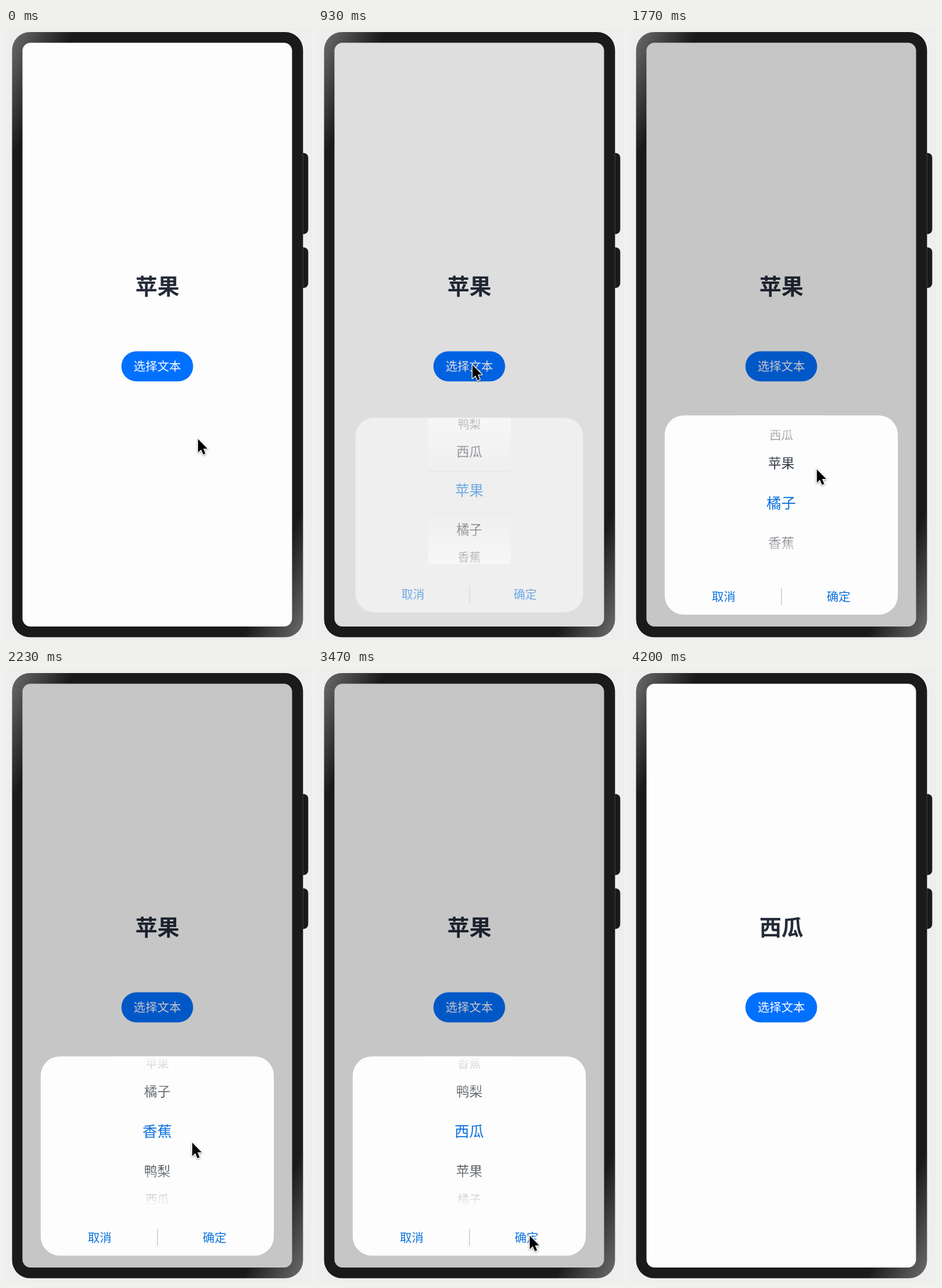
These frames come from a looping animation (529 by 1059 pixels, 4960 ms). An HTML page:

```html
<!DOCTYPE html>
<html lang="zh-CN">
<head>
<meta charset="utf-8">
<title>文本选择器</title>
<style>
  html, body { margin: 0; width: 100%; height: 100%; overflow: hidden; background: #eee; }
  svg { display: block; width: 100vw; height: 100vh; }
  text { font-family: "Noto Sans CJK SC", "Noto Sans CJK", sans-serif; font-weight: 500; text-anchor: middle; }
  #panel > * { opacity: var(--alpha); }
  .action { font-size: 20.5px; fill: #0a72de; }
  .item { fill: #1a222c; }
  .item.on { fill: #0a70dd; }
  #cursor { filter: drop-shadow(0 1.5px 1.5px rgba(0, 0, 0, .4)); }
</style>
</head>
<body>
<svg viewBox="0 0 529 1059">
  <defs>
    <linearGradient id="metal" gradientUnits="userSpaceOnUse" x1="13.6" y1="6.4" x2="823.5" y2="389">
      <stop offset="0" stop-color="#6a6a6a"/>
      <stop offset=".103" stop-color="#1a1a1a"/>
      <stop offset=".897" stop-color="#1a1a1a"/>
      <stop offset="1" stop-color="#6a6a6a"/>
    </linearGradient>
    <linearGradient id="fadeTop" x2="0" y2="1">
      <stop offset="0" stop-color="#fdfdfd"/>
      <stop offset="1" stop-color="#fdfdfd" stop-opacity="0"/>
    </linearGradient>
    <linearGradient id="fadeBottom" x2="0" y2="1">
      <stop offset="0" stop-color="#fdfdfd" stop-opacity="0"/>
      <stop offset="1" stop-color="#fdfdfd"/>
    </linearGradient>
    <clipPath id="window"><rect x="188" y="669" width="147" height="259"/></clipPath>
  </defs>

  <rect width="529" height="1059" fill="#eee"/>
  <g fill="#1a1a1a">
    <path d="M513 216h1.5a8 8 0 0 1 8 8v124a8 8 0 0 1-8 8H513z"/>
    <path d="M513 379h1.5a8 8 0 0 1 8 8v54a8 8 0 0 1-8 8H513z"/>
  </g>
  <rect x="10.5" y="7" width="503" height="1045.5" rx="31" fill="url(#metal)"/>
  <path d="M513.5 217v138M513.5 380v68" stroke="#555" stroke-width=".7"/>
  <rect x="28.5" y="25.5" width="466" height="1008.5" rx="14" fill="#fdfdfd"/>

  <text id="title" x="261.7" y="459.5" font-size="38" fill="#242b39" style="font-weight:700"></text>
  <rect x="199.5" y="558.5" width="124" height="52" rx="26" fill="#0070ff"/>
  <text x="261.5" y="592.3" font-size="20.5" fill="#fff">选择文本</text>

  <rect id="dim" x="28.5" y="25.5" width="466" height="1008.5" rx="14"/>

  <g id="panel">
    <rect x="60" y="669.3" width="403" height="344.2" rx="33" fill="#fdfdfd"/>
    <g id="wheel" clip-path="url(#window)"></g>
    <rect x="188" y="669.3" width="147" height="94" fill="url(#fadeTop)"/>
    <rect x="188" y="836" width="147" height="92" fill="url(#fadeBottom)"/>
    <path id="rules" d="M188 763.5h147M188 836h147" stroke="#000"/>
    <path d="M261.8 967v30" stroke="#c4c4c4" stroke-width="1.3"/>
    <text class="action" x="162" y="989.8">取消</text>
    <text class="action" x="360.5" y="989.8">确定</text>
  </g>

  <path id="cursor" d="M0 0V23.2L5.3 18.2 9 26.8 12.8 25.2 9.1 16.7H16.3Z"
        fill="#000" stroke="#fff" stroke-width="2.6" paint-order="stroke" stroke-linejoin="round"/>
</svg>
<script>
  const LOOP = 4960;
  const FRUITS = ['苹果', '橘子', '香蕉', '鸭梨', '西瓜'];
  const SLOTS = [[681, 20.5], [729, 22.8], [798, 25.4], [867, 22.8], [916, 20.5]]; // centre y, size
  const STEP = 69;
  const OPEN = 775, CLOSE = 3780, CURSOR_OFF = 4200;

  const linear = u => u;
  const out = u => 1 - (1 - u) ** 2;
  const smooth = u => u * u * (3 - 2 * u);
  const clamp = u => Math.min(1, Math.max(0, u));
  const cubicOut = u => 1 - (1 - clamp(u)) ** 3;

  // rows: time, easing into this row, values
  const SCROLL = [
    [0, linear, 0],
    [1650, linear, 0], [1770, linear, .667], [2150, out, 2],
    [2460, linear, 2], [2580, linear, 2.667], [2960, out, 4]
  ];
  const POINTER = [
    [0, linear, 332, 710],
    [30, linear, 332, 710], [500, smooth, 267, 582],
    [1100, linear, 267, 582], [1490, smooth, 325, 809],
    [1650, linear, 325, 809], [1770, linear, 323, 763], [1850, out, 322, 738],
    [2230, smooth, 322, 818], [2330, out, 321, 835],
    [2460, linear, 321, 835], [2580, linear, 318, 789], [2720, out, 315, 745],
    [2900, linear, 314, 738], [2960, linear, 315, 742],
    [3230, smooth, 350, 988], [3450, smooth, 366, 979]
  ];

  function sample(rows, t) {
    const i = rows.findIndex(r => r[0] > t);
    if (i < 0) return rows[rows.length - 1].slice(2);
    const a = rows[i - 1], b = rows[i];
    const u = b[1]((t - a[0]) / (b[0] - a[0]));
    return a.slice(2).map((v, n) => v + (b[n + 2] - v) * u);
  }

  const $ = id => document.getElementById(id);
  const title = $('title'), dim = $('dim'), panel = $('panel'), rules = $('rules'), cursor = $('cursor');

  const items = SLOTS.map(([, size], i) => {
    const el = document.createElementNS('http://www.w3.org/2000/svg', 'text');
    el.setAttribute('class', i === 2 ? 'item on' : 'item');
    el.setAttribute('x', 261.5);
    el.setAttribute('font-size', size);
    if (i !== 2) el.style.fontWeight = 400;
    $('wheel').append(el);
    return el;
  });

  function drawWheel(pos) {
    const mid = Math.round(pos), shift = (mid - pos) * STEP;
    items.forEach((el, i) => {
      const [y, size] = SLOTS[i];
      el.textContent = FRUITS[(mid + i + 3) % 5];
      el.setAttribute('y', y + shift + size * .38);
    });
  }

  function drawPanel(t) {
    const closing = t >= CLOSE;
    const alpha = closing ? 1 - clamp((t - CLOSE) / 144) : clamp((t - OPEN) / 280);
    const grow = closing ? 1 - cubicOut((t - CLOSE) / 187) : cubicOut((t - OPEN) / 340);
    dim.setAttribute('opacity', .22 * alpha);
    panel.style.display = alpha ? '' : 'none';
    panel.style.setProperty('--alpha', alpha);
    panel.setAttribute('transform',
      `translate(261.5 841.2) scale(${.85 + .15 * grow}) translate(-261.5 -841.2)`);
    rules.setAttribute('stroke-opacity', .012 + .36 * alpha * (1 - alpha));
  }

  function render(t) {
    title.textContent = FRUITS[t < CLOSE ? 0 : 4];
    drawPanel(t);
    drawWheel(sample(SCROLL, t)[0]);
    cursor.setAttribute('transform', `translate(${sample(POINTER, t).join(' ')})`);
    cursor.style.display = t < CURSOR_OFF ? '' : 'none';
  }

  const start = performance.now();
  function tick() {
    render((performance.now() - start) % LOOP);
    requestAnimationFrame(tick);
  }
  tick();
</script>
</body>
</html>
```
